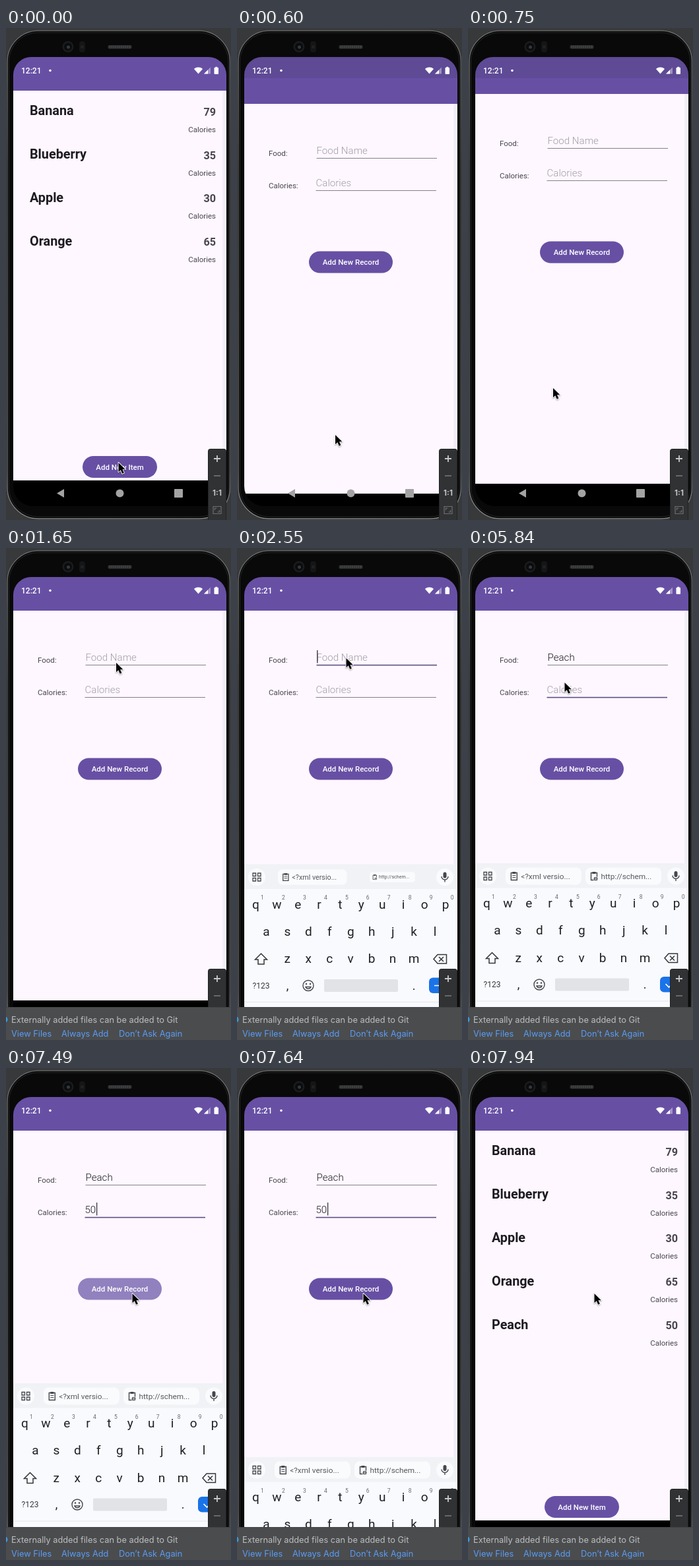
Animation, 341 px wide and 746 px high, one loop 8 s. Source, as an HTML page with a canvas:

```html
<!DOCTYPE html>
<html lang="en">
<head>
<meta charset="utf-8">
<title>Calorie list</title>
<style>
html, body { margin: 0; width: 100%; height: 100%; overflow: hidden; background: #37393b; }
canvas { display: block; width: 341px; height: 746px; }
</style>
</head>
<body>
<canvas id="stage"></canvas>
<script>
const W = 341, H = 746, LOOP = 8000;
const canvas = document.getElementById('stage');
const ctx = canvas.getContext('2d');
const dpr = window.devicePixelRatio || 1;
canvas.width = W * dpr;
canvas.height = H * dpr;

const PURPLE = '#6750a4', PRESSED = '#9181be', PAPER = '#fef7ff', INK = '#1d1b20', SOFT = '#49454f';
const ROBOTO = 'Roboto, sans-serif', INTER = 'Inter, sans-serif';

// Each track holds [start time, value...] until its next entry.
const pointerTrack = [
  [0, 170.5, 659], [600, 149, 617], [750, 129, 546], [900, 137, 450], [1050, 148, 365],
  [1200, 157, 306], [1350, 167, 235], [1500, 171, 190], [1650, 167, 174], [1950, 165.5, 167],
  [4790, 160, 182], [4940, 151, 198], [5090, 146.5, 204],
  [6740, 160, 240], [6890, 183, 312], [7040, 191.5, 342]
];
const screenTrack = [
  [0, 'list', 0], [600, 'form', 20], [750, 'form', 5], [900, 'form', 0],
  [7790, 'list', -9], [7940, 'list', 0]
];
const keyboardTrack = [
  [0, 696], [2100, 630], [2250, 535], [2400, 487], [2550, 479.5], [2700, 478],
  [7640, 590], [7790, 696]
];
const chipTrack = [[0, 0, 0], [2400, 0.5, 0], [2550, 0.91, 0.6], [2700, 1, 1]];
const foodTrack = [[0, ''], [3150, 'P'], [3290, 'Pe'], [3590, 'Pea'], [4340, 'Peac'], [4490, 'Peach']];
const calorieTrack = [[0, ''], [6140, '5'], [6440, '50']];
const focusTrack = [[0, ''], [1950, 'food'], [5240, 'calories']];
const caretTrack = [
  [0, false], [1950, true], [4040, false], [4340, true], [5090, false], [5240, true],
  [5840, false], [6140, true], [7040, false], [7340, true]
];
const pressTrack = [[0, false], [300, true], [600, false], [7340, true], [7640, false]];

function at(track, t) {
  let hit = track[0];
  for (const entry of track) if (entry[0] <= t) hit = entry;
  return hit.slice(1);
}

function rect(x, y, w, h, color) {
  ctx.fillStyle = color;
  ctx.fillRect(x, y, w, h);
}

function round(x, y, w, h, r, color) {
  ctx.beginPath();
  ctx.roundRect(x, y, w, h, r);
  ctx.fillStyle = color;
  ctx.fill();
}

function disc(x, y, r, color) {
  ctx.beginPath();
  ctx.arc(x, y, r, 0, Math.PI * 2);
  ctx.fillStyle = color;
  ctx.fill();
}

function shape(points, color) {
  ctx.beginPath();
  points.forEach(([x, y]) => ctx.lineTo(x, y));
  ctx.closePath();
  ctx.fillStyle = color;
  ctx.fill();
}

function stroke(path, color, width = 1.4) {
  ctx.strokeStyle = color;
  ctx.lineWidth = width;
  ctx.stroke(new Path2D(path));
}

function text(str, x, y, size, color, weight = 400, align = 'left', family = ROBOTO) {
  ctx.font = `${weight} ${size}px ${family}`;
  ctx.textAlign = align;
  ctx.fillStyle = color;
  ctx.fillText(str, x, y);
}

function local(x, y, scale, draw) {
  ctx.save();
  ctx.translate(x, y);
  ctx.scale(scale, scale);
  draw();
  ctx.restore();
}

function drawPhone() {
  rect(0, 0, W, H, '#37393b');
  round(1, 3, 339.5, 742, 48, '#090909');
  const rim = ctx.createLinearGradient(0, 0, 0, H);
  rim.addColorStop(0, '#6d6e6f');
  rim.addColorStop(0.3, '#4a4b4c');
  rim.addColorStop(0.9, '#5c5d5e');
  rim.addColorStop(1, '#8a8a8a');
  ctx.strokeStyle = rim;
  ctx.lineWidth = 1.6;
  ctx.beginPath();
  ctx.roundRect(2, 4, 337.5, 740, 47);
  ctx.stroke();
  ctx.strokeStyle = '#252627';
  ctx.lineWidth = 1;
  ctx.beginPath();
  ctx.roundRect(4.5, 7, 332.5, 734, 44);
  ctx.stroke();

  disc(94, 28.5, 8.5, '#1b1c1d');
  disc(94, 28.5, 6, '#0b0c0e');
  disc(94.5, 29, 2.5, '#34383d');
  round(111, 20, 9, 17, 4, '#141516');
  disc(115.5, 28.5, 2.5, '#202124');
  round(154.5, 26, 36, 5.5, 2, '#303132');
  for (let x = 157; x < 189; x += 3) rect(x, 27, 1, 3.5, '#4b4c4d');
}

function clipScreen() {
  ctx.beginPath();
  ctx.roundRect(11, 44, 323, 681, [27, 27, 30, 30]);
  ctx.clip();
}

function drawButton(label, x, y, w, pressed) {
  round(x, y, w, 33, 16.5, pressed ? PRESSED : PURPLE);
  text(label, x + w / 2, y + 20.6, 11.5, '#fff', 500, 'center');
}

function drawPage(dy) {
  rect(11, 44, 323, 51 + dy, PURPLE);
  rect(11, 95 + dy, 323, 591, PAPER);
  rect(328, 95 + dy, 6, 591, 'rgba(238,236,246,.65)');
}

function drawList(dy, pressed, withNewItem) {
  drawPage(dy);
  const items = [['Banana', 79], ['Blueberry', 35], ['Apple', 30], ['Orange', 65]];
  if (withNewItem) items.push(['Peach', 50]);
  items.forEach(([name, calories], i) => {
    const y = 132.4 + dy + i * 65.8;
    text(name, 36, y, 19.8, INK, 700);
    text(calories, 318, y + 0.3, 16.2, SOFT, 700, 'right');
    text('Calories', 318, y + 25.3, 11.5, SOFT, 400, 'right');
  });
  drawButton('Add New Item', 116, 649 + dy, 113, pressed);
}

function drawField(label, hint, value, x, y, focused, caret) {
  text(label, 48, y + 2.7, 11.5, SOFT);
  text(value || hint, x, y, 15.1, value ? INK : '#a29da6', 300);
  const end = value ? x + ctx.measureText(value).width + 0.6 : x + 0.5;
  if (focused) rect(x, y + 5.8, 182.5, 1.6, '#5e4f84');
  else rect(x, y + 6, 182.5, 1, '#85808a');
  if (focused && caret) rect(end, y - 16, 1.5, 19.5, '#4c4952');
}

function drawForm(dy, t, pressed) {
  drawPage(dy);
  const [focus] = at(focusTrack, t), [caret] = at(caretTrack, t);
  drawField('Food:', 'Food Name', at(foodTrack, t)[0], 120.5, 171 + dy, focus === 'food', caret);
  drawField('Calories:', 'Calories', at(calorieTrack, t)[0], 119.5, 220 + dy, focus === 'calories', caret);
  drawButton('Add New Record', 109, 318.5 + dy, 127, pressed);
}

function drawStatus(dimmed) {
  if (dimmed) rect(11, 44, 323, 32, 'rgba(40,40,60,.15)');
  text('12:21', 23, 69, 12, '#fff', 500);
  disc(67, 64.5, 1.8, '#fff');
  ctx.beginPath();
  ctx.moveTo(291.5, 69.5);
  ctx.arc(291.5, 69.5, 10, -Math.PI * 0.73, -Math.PI * 0.27);
  ctx.fillStyle = '#fff';
  ctx.fill();
  shape([[300, 69.5], [310, 69.5], [310, 59.5]], 'rgba(255,255,255,.4)');
  shape([[300, 69.5], [306, 69.5], [306, 63.5]], '#fff');
  round(315.5, 60, 6.5, 10, 1, '#fff');
  rect(317.3, 58.8, 2.9, 2, '#fff');
}

function drawNavigation(dy) {
  rect(11, 686 + dy, 323, 50, '#000');
  const gray = '#a3a3a3';
  shape([[77, 705.5], [88, 699], [88, 712]], gray);
  disc(172.5, 705.5, 6, gray);
  round(255, 699, 13, 13, 1, gray);
}

function drawChip(label, center, scale, linked) {
  if (!scale) return;
  local(center, 19.5, scale, () => {
    round(-57.5, -13, 115, 26, 8, '#fafbfd');
    stroke('M-49 -5h9v11h-9z', '#44474c', 1.4);
    rect(-47, -6.5, 5, 3, '#44474c');
    if (linked) {
      rect(-45, 1, 6, 6, '#fafbfd');
      stroke('M-45 4h6M-44 2h4v4h-4z', '#44474c', 1);
    } else {
      stroke('M-47 -1h5M-47 2h5', '#44474c', 1);
    }
    text(label, -34, 4, 11.8, '#55585d');
  });
}

function drawKeyboard(y, t) {
  if (y >= 696) return;
  ctx.save();
  ctx.translate(0, y);
  rect(11, 0, 323, 230, '#f9fafd');
  rect(11, 0, 323, 37.5, '#f0f2f6');

  disc(30, 19.5, 13, '#fafbfd');
  for (const [x, dy] of [[24, 13.5], [31.5, 13.5], [24, 21], [31.5, 21]]) {
    stroke(`M${x} ${dy}h4.5v4.5h-4.5z`, '#44474c', 1.3);
  }
  const [first, second] = at(chipTrack, t);
  drawChip('<?xml versio...', 114.3, first, false);
  drawChip('http://schem...', 235.5, second, true);
  disc(315, 19.5, 13, '#fafbfd');
  round(312.5, 12, 5, 9, 2.5, '#44474c');
  stroke('M310 18.5a5 5 0 0 0 10 0M315 23.5v3.5', '#44474c');

  [...'qwertyuiop'].forEach((key, i) => {
    const x = 28.5 + i * 31.95;
    text(key, x, 67, 19, '#1f2023', 400, 'center');
    text((i + 1) % 10, x + 10, 53.5, 8.5, '#66696e', 400, 'center');
  });
  [...'asdfghjkl'].forEach((key, i) => text(key, 44.5 + i * 31.95, 108.3, 19, '#1f2023', 400, 'center'));
  [...'zxcvbnm'].forEach((key, i) => text(key, 76.3 + i * 31.95, 149.8, 19, '#1f2023', 400, 'center'));
  stroke('M36.5 135.5l-9 9h4.5v7h9v-7h4.5z', '#33363a', 1.5);
  stroke('M304 137h13.5v13.5H304l-6-6.75zM306 140.5l7 7m0 -7l-7 7', '#33363a', 1.5);

  text('?123', 36.5, 188, 12, '#33363a', 400, 'center');
  text(',', 76.5, 190, 18, '#1f2023', 400, 'center');
  text('.', 268, 190, 18, '#1f2023', 400, 'center');
  stroke('M100 184a8 8 0 1 0 16 0a8 8 0 1 0 -16 0M104 186a4.3 4.3 0 0 0 8 0z', '#44474c');
  disc(105, 181.5, 1.2, '#44474c');
  disc(111, 181.5, 1.2, '#44474c');
  round(132, 174.5, 112, 19, 2, '#e1e3e6');
  round(291, 172, 34, 23.5, 6, '#1a73e8');
  stroke(t < 5390 ? 'M299 184h14m-5 -5l5 5l-5 5' : 'M299.5 183l5 5l10 -10', '#fff', 1.7);
  rect(11, 208.5, 323, 1, '#e4e6ea');
  ctx.restore();
}

function drawTools() {
  round(306, 638, 28, 115, 4, '#222325');
  round(307, 639, 26, 115, 3, '#303234');
  stroke('M315 653h10M320 648v10', '#c6c7c8', 1.8);
  stroke('M315 679h10', '#747678', 1.6);
  text('1:1', 320, 709, 11.5, '#c6c7c8', 700, 'center', INTER);
  stroke('M314 725.5h12v11h-12zM316.5 731v-3h3M323.5 731v3h-3', '#6c6e70', 1.2);
}

function drawNotice() {
  rect(0, 696, W, 50, '#4b4c4e');
  rect(0, 696, W, 1, '#434446');
  disc(-2.5, 715, 5, '#3d9ad8');
  const line = (str, x, y, color) => text(str, x, y, 12.8, color, 400, 'left', INTER);
  line('Externally added files can be added to Git', 8, 720, '#bdbec0');
  line('View Files', 8, 741, '#589df6');
  line('Always Add', 84, 741, '#589df6');
  line('Don’t Ask Again', 171, 741, '#589df6');
}

function drawPointer(x, y) {
  local(x, y, 1, () => {
    const arrow = new Path2D('M0 0V14.2L3.3 11.2L5.7 16.8L8.4 15.6L6 10.2H10.4Z');
    ctx.shadowColor = 'rgba(0,0,0,.35)';
    ctx.shadowBlur = 2 * dpr;
    ctx.shadowOffsetY = dpr;
    ctx.lineJoin = 'round';
    ctx.strokeStyle = '#fff';
    ctx.lineWidth = 1.8;
    ctx.stroke(arrow);
    ctx.shadowColor = 'transparent';
    ctx.fillStyle = '#000';
    ctx.fill(arrow);
  });
}

function draw(t) {
  ctx.setTransform(dpr, 0, 0, dpr, 0, 0);
  const [screen, dy] = at(screenTrack, t);
  const [pressed] = at(pressTrack, t);

  drawPhone();
  ctx.save();
  clipScreen();
  if (screen === 'list') drawList(dy, pressed, t > 4000);
  else drawForm(dy, t, pressed);
  drawNavigation(dy);
  drawStatus(screen === 'form' && dy > 0);
  drawKeyboard(at(keyboardTrack, t)[0], t);
  ctx.restore();

  drawTools();
  if (t >= 1050) drawNotice();
  drawPointer(...at(pointerTrack, t));
}

const start = performance.now();
function tick() {
  draw((performance.now() - start) % LOOP);
  requestAnimationFrame(tick);
}
tick();
</script>
</body>
</html>
```
